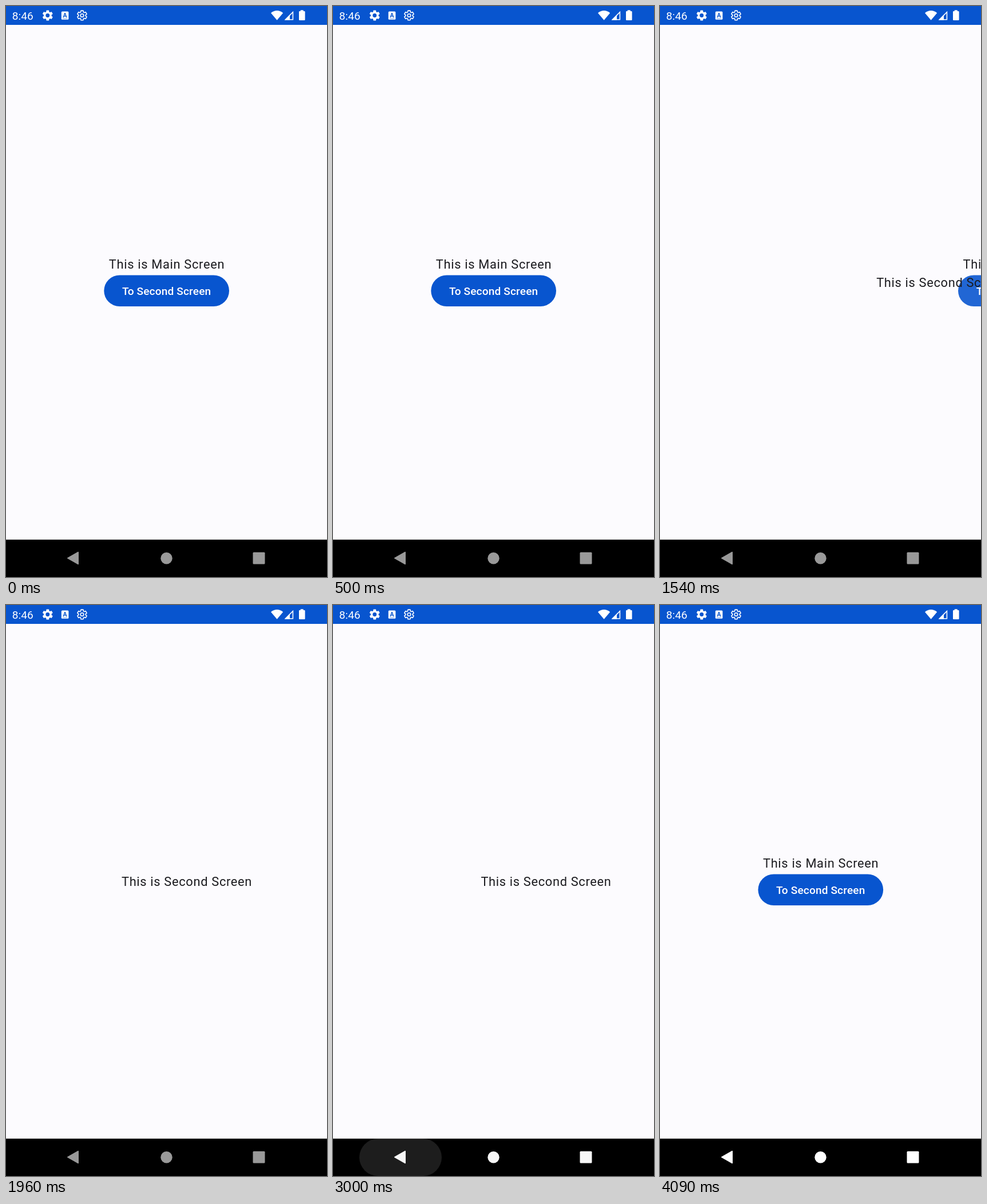
An HTML page for the animation above (4.14 s loop, 561 by 998 pixels).

```html
<!DOCTYPE html>
<html lang="en">
<head>
<meta charset="utf-8">
<title>Screen navigation</title>
<style>
  html, body { margin: 0; width: 100%; height: 100%; overflow: hidden; background: #fcfbfe; }
  svg { display: block; width: 561px; height: 998px; font-family: Roboto, sans-serif; }
  .body { font-size: 21.82px; letter-spacing: .68px; fill: #1b1b1f; text-anchor: middle; }
  .label { font-size: 19.09px; font-weight: 500; letter-spacing: .14px; fill: #fff; text-anchor: middle; }
</style>
</head>
<body>
<svg viewBox="0 0 561 998">
  <defs>
    <path id="gear" d="M19.14 12.94c.04-.3.06-.61.06-.94 0-.32-.02-.64-.07-.94l2.03-1.58c.18-.14.23-.41.12-.61l-1.92-3.32c-.12-.22-.37-.29-.59-.22l-2.39.96c-.5-.38-1.03-.7-1.62-.94l-.36-2.54c-.04-.24-.24-.41-.48-.41h-3.84c-.24 0-.43.17-.47.41l-.36 2.54c-.59.24-1.13.57-1.62.94l-2.39-.96c-.22-.08-.47 0-.59.22L2.74 8.87c-.12.21-.08.47.12.61l2.03 1.58c-.05.3-.09.63-.09.94s.02.64.07.94l-2.03 1.58c-.18.14-.23.41-.12.61l1.92 3.32c.12.22.37.29.59.22l2.39-.96c.5.38 1.03.7 1.62.94l.36 2.54c.05.24.24.41.48.41h3.84c.24 0 .44-.17.47-.41l.36-2.54c.59-.24 1.13-.56 1.62-.94l2.39.96c.22.08.47 0 .59-.22l1.92-3.32c.12-.22.07-.47-.12-.61z"/>
  </defs>
  <rect width="561" height="998" fill="#fcfbfe"/>

  <g id="main">
    <text class="body" x="281" y="458.7">This is Main Screen</text>
    <rect x="171.3" y="470.5" width="218.7" height="54.5" rx="27.25" fill="#0855cf"/>
    <rect id="press" x="171.3" y="470.5" width="218.7" height="54.5" rx="27.25" fill="#fff"/>
    <text class="label" x="280.6" y="505">To Second Screen</text>
  </g>
  <text id="second" class="body" x="281" y="491.3">This is Second Screen</text>

  <!-- status bar -->
  <rect width="561" height="33" fill="#0855cf"/>
  <g fill="#fff">
    <text x="10.8" y="24" font-size="19.1">8:46</text>
    <g transform="translate(61.4 5.1) scale(.95)">
      <use href="#gear"/>
      <circle cx="12" cy="12" r="3.6" fill="#0855cf"/>
    </g>
    <rect x="96.8" y="9.4" width="12.6" height="14.4" rx="1.6"/>
    <text x="103.1" y="19.6" font-size="10.5" font-weight="700" text-anchor="middle" fill="#0855cf">A</text>
    <path d="M99.5 21.8h7.2" stroke="#0855cf" stroke-width="1" stroke-dasharray="1 1"/>
    <g transform="translate(122 5.5) scale(.915)" fill="none" stroke="#fff" stroke-width="1.8">
      <use href="#gear" transform="translate(.6 .6) scale(.95)"/>
      <circle cx="12" cy="12" r="3"/>
    </g>
    <path d="M463 12.2Q473.6 4 484.2 12.2L473.6 24.8Z"/>
    <path d="M488.5 23.7H501.4V10.8Z" fill="none" stroke="#fff" stroke-width="1.6"/>
    <path d="M487 24.4H496V15.4Z"/>
    <path d="M514.7 9V7.2h5V9h1.7q1.2 0 1.2 1.2v13.6q0 1.2-1.2 1.2h-8.2q-1.2 0-1.2-1.2V10.2q0-1.2 1.2-1.2z"/>
  </g>

  <!-- navigation bar -->
  <rect y="932.7" width="561" height="65.3"/>
  <rect id="pill" x="-72" y="-32.5" width="144" height="65" rx="32.5" fill="#fff"/>
  <g id="icons" fill="#fff">
    <path d="M108 965L126 954.8V975.2Z" stroke="#fff" stroke-width="2" stroke-linejoin="round"/>
    <circle cx="280.5" cy="965.2" r="10.2"/>
    <rect x="431.5" y="954.8" width="21" height="20.8" rx="1.5"/>
  </g>
</svg>
<script>
const LOOP = 4140, WIDTH = 561, SLIDE = 1430;
const FORWARD = 962, BACK = 2692;
const $ = id => document.getElementById(id);
const ramp = (t, from, to) => Math.min(1, Math.max(0, (t - from) / (to - from)));

// cubic-bezier(.4, 0, .2, 1), solved by bisection
function ease(x) {
  let lo = 0, hi = 1;
  for (let i = 0; i < 24; i++) {
    const s = (lo + hi) / 2, r = 1 - s;
    if (1.2 * r * r * s + .6 * r * s * s + s ** 3 < x) lo = s; else hi = s;
  }
  return lo * lo * (3 - 2 * lo);
}

const shift = (id, x) => $(id).setAttribute('transform', `translate(${x.toFixed(2)} 0)`);

function draw(t) {
  const out = ease(ramp(t, FORWARD, FORWARD + SLIDE));
  const back = ease(ramp(t, BACK, BACK + SLIDE));
  const away = t < BACK ? out : 1 - back;
  shift('main', WIDTH * away);
  shift('second', WIDTH * (1 - away));
  $('press').setAttribute('opacity', t < BACK ? .1 * ramp(t, 860, 960) : 0);

  const grow = .74 + .26 * ramp(t, 2600, 2850);
  $('pill').setAttribute('transform', `translate(118 965.4) scale(${grow})`);
  $('pill').setAttribute('opacity', t < 2600 ? 0 : .19 * (1 - ramp(t, 2800, 3310)));
  $('icons').setAttribute('opacity', .6 + .4 * ramp(t, 2600, 3040));
}

const start = performance.now();
function tick() {
  draw((performance.now() - start) % LOOP);
  requestAnimationFrame(tick);
}
draw(0);
requestAnimationFrame(tick);
</script>
</body>
</html>
```
